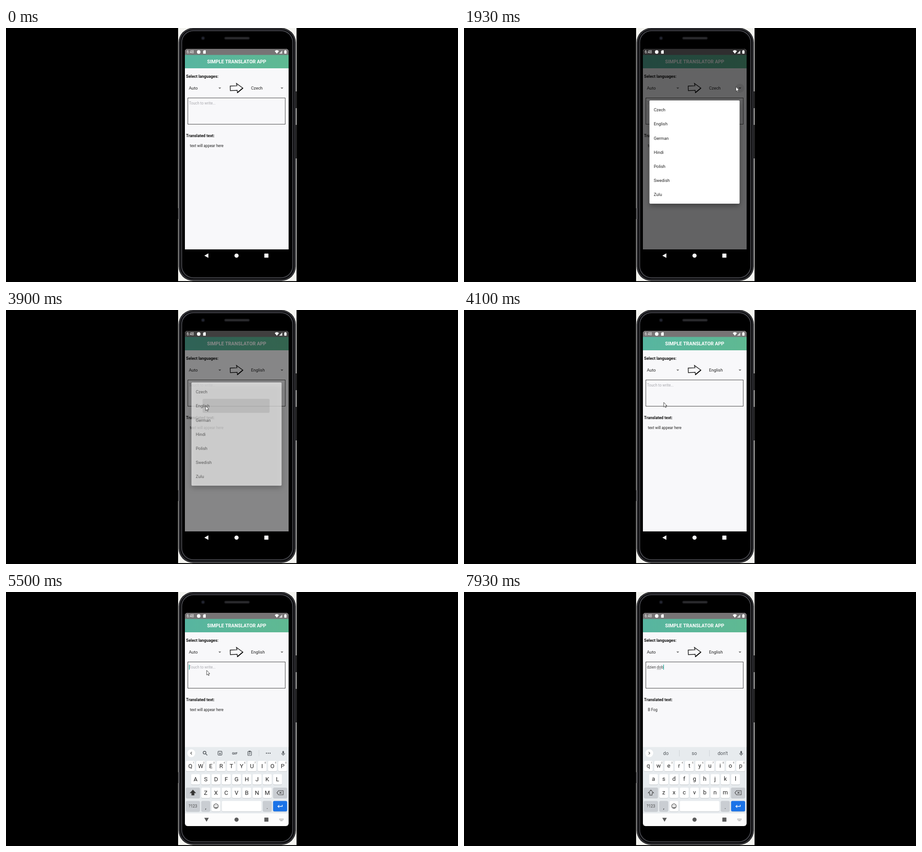
Write an HTML page with a canvas that moves like this. It is 998x561 px and loops after 8 s.

```html
<!DOCTYPE html>
<html lang="en">
<head>
<meta charset="utf-8">
<title>Simple translator app</title>
<style>
  html, body { margin: 0; width: 100%; height: 100%; overflow: hidden; background: #000; }
  canvas { display: block; width: 998px; height: 561px; }
</style>
</head>
<body>
<canvas id="stage" width="998" height="561"></canvas>
<script>
const ctx = document.getElementById('stage').getContext('2d');
const LOOP = 8000;
const FONT = 'Roboto, "Noto Sans", sans-serif';
const LANGS = ['Czech', 'English', 'German', 'Hindi', 'Polish', 'Swedish', 'Zulu'];
const PITCH = 22.65;

// Pointer stops: time, x, y
const PATH = [
  [1570, 620, 165], [1710, 600.3, 129.6], [2080, 600.3, 129.6], [2370, 599, 159],
  [2830, 448, 292], [2970, 448, 292], [3250, 444, 306], [3620, 440.8, 211.8],
  [3930, 440.8, 211.8], [4040, 441, 204], [4150, 441, 204], [4400, 443, 173], [5870, 443, 173]
];
// Typed text by time
const TYPED = [
  [5880, 'd'], [6040, 'dz'], [6190, 'dzi'], [6340, 'dzie'], [6490, 'dzien'],
  [6740, 'dzien '], [7060, 'dzien d'], [7560, 'dzien do'], [7800, 'dzien dob']
];

const clamp = v => Math.max(0, Math.min(1, v));
const prog = (t, start, dur) => clamp((t - start) / dur);
const smooth = p => p * p * (3 - 2 * p);
const easeOut = (p, k) => 1 - Math.pow(1 - p, k);

function box(x, y, w, h, r, fill) {
  ctx.beginPath();
  ctx.roundRect(x, y, w, h, r);
  if (fill) { ctx.fillStyle = fill; ctx.fill(); }
}

function ring(x, y, w, h, r, color, width) {
  box(x, y, w, h, r);
  ctx.strokeStyle = color;
  ctx.lineWidth = width;
  ctx.stroke();
}

function disc(x, y, r, fill) {
  ctx.beginPath();
  ctx.arc(x, y, r, 0, Math.PI * 2);
  ctx.fillStyle = fill;
  ctx.fill();
}

function poly(points, fill, stroke, width = 1, open) {
  ctx.beginPath();
  points.forEach(([x, y]) => ctx.lineTo(x, y));
  if (!open) ctx.closePath();
  if (fill) { ctx.fillStyle = fill; ctx.fill(); }
  if (stroke) { ctx.strokeStyle = stroke; ctx.lineWidth = width; ctx.stroke(); }
}

function label(s, x, cy, size, color = '#222', weight = 400, align = 'left') {
  ctx.font = `${weight} ${size}px ${FONT}`;
  ctx.textAlign = align;
  ctx.fillStyle = color;
  ctx.fillText(s, x, cy + size * 0.355);
}

function at(x, y, draw) {
  ctx.save();
  ctx.translate(x, y);
  draw();
  ctx.restore();
}

function drawPhone() {
  ctx.fillStyle = '#000';
  ctx.fillRect(0, 0, 998, 561);
  ctx.fillStyle = '#f4f4f0';
  ctx.fillRect(380, 0, 261.5, 559);
  box(381, 0, 259, 558.5, 32, '#0e0e10');
  ring(383, 2, 255, 554.5, 30, '#47474c', 1.6);
  ring(388, 6, 245, 545.5, 26, '#55565d', 1.4);
  box(389, 7, 243, 543.5, 25, '#000');
  ctx.fillStyle = '#111';
  ctx.fillRect(639.5, 140, 2, 37);
  ctx.fillRect(639.5, 214, 2, 74);
  ctx.fillStyle = '#777';
  ctx.fillRect(380, 398, 1.5, 24);
  disc(435, 22.5, 4, '#16171d');
  disc(435, 22.5, 2, '#262a38');
  box(482, 19.5, 56, 6, 3, '#1d1d20');
  box(484, 21, 52, 3, 1.5, '#2b2b2e');
}

function drawStatus() {
  label('6:48', 399, 53, 8.3, '#fff');
  disc(425.5, 53, 3.9, '#fff');
  poly([[437, 49.3], [441, 49.3], [441, 56.7], [435.3, 56.7], [435.3, 51.2]], '#fff');
  ctx.beginPath();
  ctx.moveTo(598, 56.8);
  ctx.lineTo(593.4, 51);
  ctx.quadraticCurveTo(598, 47.2, 602.6, 51);
  ctx.closePath();
  ctx.fill();
  poly([[603, 56.7], [610, 56.7], [610, 49.5]], '#d8d8d8');
  box(614.4, 49.8, 5, 7, 0.8, '#fff');
  ctx.fillRect(615.8, 49, 2.2, 1);
}

function drawApp(t) {
  ctx.fillStyle = '#f8f8fa';
  ctx.fillRect(395, 46, 229, 443);
  ctx.fillStyle = '#777475';
  ctx.fillRect(395, 46, 229, 14);
  const grad = ctx.createLinearGradient(395, 60, 624, 89);
  grad.addColorStop(0, '#57b5a0');
  grad.addColorStop(1, '#5fb992');
  ctx.fillStyle = grad;
  ctx.fillRect(395, 59.5, 229, 29.5);
  label('SIMPLE TRANSLATOR APP', 509.3, 74.5, 10.6, '#fff', 700, 'center');

  label('Select languages:', 397.5, 107, 8.95, '#111', 700);
  label('Auto', 403.7, 133, 9.4);
  label(t < 3790 ? 'Czech' : 'English', 541, 133, 9.4);
  for (const x of [472, 609.3]) poly([[x - 3, 131.5], [x + 3, 131.5], [x, 134.6]], '#666');
  poly([[495, 128.2], [510, 127.6], [508.8, 122.5], [523, 132.8], [511, 142.8], [510.4, 137.6], [495.4, 138.4]],
    null, '#111', 1.4);
  poly([[511, 142.8], [523, 132.8]], null, '#000', 1.9, true);

  ctx.strokeStyle = '#444';
  ctx.lineWidth = 1;
  ctx.strokeRect(401.5, 154.5, 215, 58);
  drawInput(t);

  label('Translated text:', 397.5, 238, 8.95, '#111', 700);
  label(t < 7300 ? 'text will appear here' : 'B Fog', 406, 260.5, 8.3);
}

function drawInput(t) {
  let typed = '';
  for (const [time, s] of TYPED) if (t >= time) typed = s;
  if (!typed) label('Touch to write...', 404, 166.5, 8.3, '#a9a9ae');
  else label(typed, 404, 166.5, 8.3, '#444');
  ctx.font = `400 8.3px ${FONT}`;
  const width = s => ctx.measureText(s).width;
  if (t > 7700) {
    ctx.fillStyle = '#777';
    ctx.fillRect(404 + width('dzien '), 170.6, width('do'), 0.7);
  }
  const on = t >= 4430 && (t < 4930 || t >= 5430);
  if (on) {
    ctx.fillStyle = '#12a594';
    ctx.fillRect(404 + width(typed), 160.5, 1.3, 11);
  }
}

function drawDialog(t) {
  const shade = 0.6 * (prog(t, 1730, 150) - prog(t, 3850, 220));
  const alpha = prog(t, 1730, 150) - prog(t, 3850, 150);
  const press = prog(t, 1710, 120) - prog(t, 2050, 200);
  if (press > 0) disc(609, 133, 10, `rgba(0,0,0,${0.08 * press})`);
  if (shade > 0) {
    ctx.fillStyle = `rgba(0,0,0,${shade})`;
    ctx.fillRect(395, 46, 229, 443);
  }
  if (alpha <= 0) return;
  ctx.save();
  ctx.globalAlpha = alpha;
  const scale = 0.92 + 0.08 * easeOut(prog(t, 1730, 170), 3);
  ctx.translate(509, 274);
  ctx.scale(scale, scale);
  ctx.translate(-509, -274);
  ctx.shadowColor = 'rgba(0,0,0,.35)';
  ctx.shadowBlur = 12;
  ctx.shadowOffsetY = 5;
  box(409.5, 160, 199, 228, 2, '#fff');
  ctx.shadowColor = 'transparent';
  const grow = 74 * easeOut(prog(t, 3640, 260), 3);
  if (grow > 0) box(508 - grow, 196.3, grow * 2, 31, 3, 'rgba(0,0,0,.13)');
  LANGS.forEach((name, i) => label(name, 419, 181 + i * 31.15, 9.4, '#222'));
  ctx.restore();
}

function key(x, y, w, s, o = {}) {
  box(x, y - 11, w, 23.6, 3, '#c6cace');
  box(x, y - 11.5, w, 23, 3, o.fill || '#fff');
  if (s) label(s, x + w / 2, y + (o.dy || 0), o.size || 13, o.color || '#222', 400, 'center');
}

function mic(x, y) {
  box(x - 1.6, y - 5, 3.2, 6.6, 1.6, '#50555a');
  ctx.beginPath();
  ctx.arc(x, y - 0.3, 3.4, 0, Math.PI);
  ctx.moveTo(x, y + 3);
  ctx.lineTo(x, y + 5.5);
  ctx.strokeStyle = '#50555a';
  ctx.lineWidth = 1.1;
  ctx.stroke();
}

function drawToolbar(t, typing) {
  const ink = '#50555a', y = 356;
  disc(409, y, 8.7, '#fff');
  const d = typing ? 1.3 : -1.3;
  poly([[409 - d, y - 2.8], [409 + d, y], [409 - d, y + 2.8]], null, '#444', 1.2, true);
  mic(612, y);
  if (typing) {
    const words = t >= 6330 && t < 7200 ? ['dzi', 'did', 'dies'] : ['do', 'so', "don't"];
    words.forEach((w, i) => label(w, 445.8 + i * 62.7, y + 0.5, 10.6, '#50555a', 400, 'center'));
    ctx.fillStyle = '#ced2d5';
    ctx.fillRect(475, y - 7, 1, 14);
    ctx.fillRect(541.5, y - 7, 1, 14);
    return;
  }
  ctx.strokeStyle = ink;
  ctx.lineWidth = 1.4;
  ctx.beginPath();
  ctx.arc(438.4, y - 1.2, 3.1, 0, 7);
  ctx.stroke();
  poly([[440.7, y + 1], [444.4, y + 4.8]], null, ink, 1.5, true);
  ring(468, y - 4.4, 8.8, 8.8, 1.8, ink, 1.2);
  ctx.beginPath();
  ctx.arc(472.4, y + 0.3, 2.3, 0, Math.PI);
  ctx.fillStyle = ink;
  ctx.fill();
  ctx.fillRect(470.2, y - 2.2, 1.2, 1.2);
  ctx.fillRect(473.4, y - 2.2, 1.2, 1.2);
  label('GIF', 505, y, 8, ink, 700, 'center');
  ring(534, y - 4, 8, 9, 1, ink, 1.2);
  ctx.fillStyle = ink;
  ctx.fillRect(536, y - 5.3, 4, 3);
  ctx.fillRect(535.8, y - 0.6, 4.4, 1);
  ctx.fillRect(535.8, y + 1.6, 3.2, 1);
  ctx.fillStyle = '#d8dbde';
  ctx.fillRect(558, y - 7, 1, 14);
  for (const x of [575, 579, 583]) disc(x, y, 1.2, ink);
}

function drawKeyboard(t) {
  const p = prog(t, 4630, 280);
  if (p <= 0) return;
  const typing = t >= 5880;
  const cased = s => typing ? s.toLowerCase() : s;
  const dy = typing ? -1 : 0;
  const gray = { fill: '#c9cdd2' };
  at(0, 145 * (1 - easeOut(p, 2.7)), () => {
    ctx.fillStyle = '#e7ebee';
    ctx.fillRect(395, 342.5, 229, 146.5);
    drawToolbar(t, typing);
    [...'QWERTYUIOP'].forEach((c, i) => {
      key(397.2 + i * PITCH, 384.5, 19.6, cased(c), { dy });
      label(String((i + 1) % 10), 414 + i * PITCH, 377.3, 5.2, '#555', 400, 'center');
    });
    [...'ASDFGHJKL'].forEach((c, i) => key(408.6 + i * PITCH, 413.8, 19.6, cased(c), { dy }));
    [...'ZXCVBNM'].forEach((c, i) => key(431.2 + i * PITCH, 443.4, 19.6, cased(c), { dy }));

    key(397.2, 443.4, 31, '', gray);
    poly([[412.7, 437.3], [418.6, 443.6], [415.4, 443.6], [415.4, 448.6], [410, 448.6], [410, 443.6], [406.8, 443.6]],
      typing ? null : '#333', '#444', 1.1);
    key(589.7, 443.4, 31, '', gray);
    poly([[598.2, 443.4], [601.8, 438.8], [612, 438.8], [612, 448], [601.8, 448]], null, '#444', 1.1);
    poly([[603.8, 441.2], [608.4, 445.6]], null, '#444', 1.1, true);
    poly([[608.4, 441.2], [603.8, 445.6]], null, '#444', 1.1, true);

    key(397.2, 473, 31, '?123', { ...gray, size: 8.7, color: '#444' });
    key(431.2, 473, 19.6, ',', { ...gray, size: 12, dy: 1.5 });
    key(453.8, 473, 19.6, '');
    ctx.strokeStyle = '#444';
    ctx.lineWidth = 1.1;
    ctx.beginPath();
    ctx.arc(463.6, 473, 5.1, 0, 7);
    ctx.stroke();
    ctx.beginPath();
    ctx.arc(463.6, 473.7, 2.7, 0.1, Math.PI - 0.1);
    ctx.stroke();
    disc(461.8, 471.5, 0.8, '#444');
    disc(465.4, 471.5, 0.8, '#444');
    key(476.4, 473, 87.5, '');
    key(567, 473, 19.6, '.', { ...gray, size: 12, dy: 1.5 });
    key(589.7, 473, 31, '', { fill: '#1a73e8' });
    poly([[610, 470], [610, 473.5], [600.5, 473.5]], null, '#fff', 1.3, true);
    poly([[603.2, 470.6], [600.2, 473.5], [603.2, 476.4]], null, '#fff', 1.3, true);
  });
}

function drawNav(t) {
  const p = prog(t, 4630, 100);
  const level = Math.round(255 - 165 * p);
  const ink = `rgb(${level},${level},${level})`;
  at(442.8, 502.7, () => {
    ctx.rotate(-Math.PI / 2 * smooth(prog(t, 4640, 300)));
    poly([[-4.8, 0], [4, -5], [4, 5]], ink);
  });
  disc(509, 502.8, 4.6, ink);
  box(570.4, 498.3, 9, 9, 0.6, ink);
  if (p <= 0) return;
  ctx.globalAlpha = p;
  ctx.fillStyle = '#8a8a8a';
  for (let r = 0; r < 2; r++)
    for (let i = 0; i < 5; i++) ctx.fillRect(603.5 + i * 2, 500.5 + r * 2, 1.2, 1.2);
  ctx.fillRect(605.5, 504.6, 5.2, 1);
  ctx.globalAlpha = 1;
}

function drawPointer(t) {
  const last = PATH.length - 1;
  if (t < PATH[0][0] || t >= PATH[last][0]) return;
  const i = PATH.findIndex(k => k[0] > t) - 1;
  const [t0, x0, y0] = PATH[i], [t1, x1, y1] = PATH[i + 1];
  const p = smooth((t - t0) / (t1 - t0));
  at(x0 + (x1 - x0) * p, y0 + (y1 - y0) * p, () =>
    poly([[0, 0], [0, 10.4], [2.4, 8.3], [4, 11.8], [5.6, 11], [4, 7.6], [7, 7.4]], '#fff', '#333', 0.9));
}

function render(t) {
  drawPhone();
  ctx.save();
  box(395, 46, 229, 471, 6);
  ctx.clip();
  drawApp(t);
  drawDialog(t);
  drawStatus();
  const nav = prog(t, 4630, 100);
  if (nav > 0) {
    ctx.fillStyle = `rgba(252,252,252,${nav})`;
    ctx.fillRect(395, 489, 229, 28);
  }
  drawKeyboard(t);
  drawNav(t);
  ctx.restore();
  drawPointer(t);
}

const begin = performance.now();
function tick() {
  render((performance.now() - begin) % LOOP);
  requestAnimationFrame(tick);
}
tick();
</script>
</body>
</html>
```
